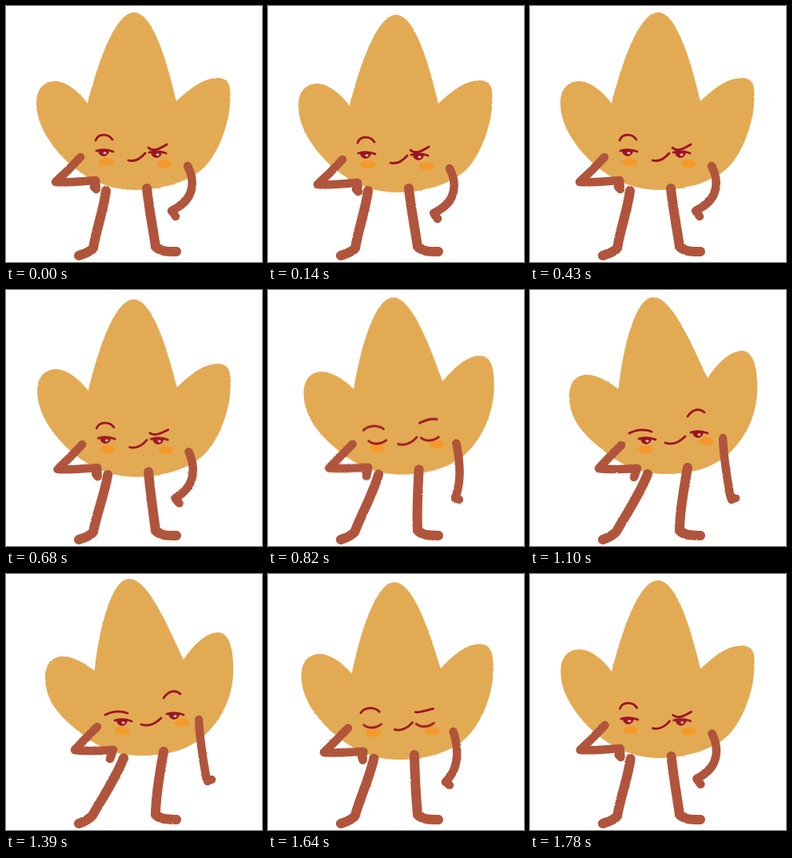
Write an HTML page without scripts that moves like this. It is 320x320 px and loops after 1.85 s.

```html
<!DOCTYPE html>
<html lang="en">
<head>
<meta charset="utf-8">
<title>Smug little hat</title>
<style>
html, body { margin: 0; width: 100%; height: 100%; overflow: hidden; background: #fff; }
svg { display: block; width: 100vw; height: 100vh; }

.body { fill: #e3aa54; }
.limb { fill: none; stroke: #b0553c; stroke-width: 12; stroke-linecap: round; stroke-linejoin: round; }
.arm { stroke-width: 10.5; }
.line { fill: none; stroke: #9c1422; stroke-width: 2.8; stroke-linecap: round; }
.blush { fill: #f39a2c; }
.pupil { fill: #9c1422; }
.shine { fill: #f6d9b4; }

/* Each .sway part has a left and a right pose; this one stepped curve carries them all across and back */
.sway {
  animation: 1850ms infinite;
  animation-timing-function: linear(
    0 0% 32.97%, .04 32.97% 36.75%, .1 36.75% 40.54%, .25 40.54% 44.32%,
    .6 44.32% 48.1%, .9 48.1% 51.89%, 1.1 51.89% 55.67%, 1 55.67% 84.86%,
    .75 84.86% 88.64%, .33 88.64% 92.43%, .12 92.43% 96.21%, .03 96.21% 100%);
}
.bob, .lid, .pupil { animation: bob 1850ms steps(2, end) infinite; }
.lid { animation-name: lid; }
.pupil { animation-name: pupil; }

@keyframes bob {
  0%, 23.24%, 29.19%, 75.13%, 81.08%, 96.21%, 100% { transform: translateY(0); }
  7.56%, 59.45%, 88.64% { transform: translateY(3px); }
  11.89%, 63.78% { transform: translateY(3px); animation-timing-function: steps(3, end); }
  36.75% { transform: translateY(4px); animation-timing-function: steps(4, end); }
  51.89% { transform: translateY(1px); }
}
@keyframes lid {
  0%, 36.75%, 51.89%, 81.08%, 96.21%, 100% { d: path("M-9 0C-2 -2 5 -2 12 1"); }
  44.32%, 88.64% { d: path("M-10 4C-4 9 6 8 12 3"); }
}
@keyframes pupil {
  0%, 36.75%, 51.89%, 81.08%, 96.21%, 100% { transform: scaleY(1); }
  44.32%, 88.64% { transform: scaleY(0); }
}

.body { animation-name: body; }
@keyframes body {
  from { d: path("M102 122C111 86 134 8 160 8S205 85 213 119C229 104 246 90 264 90S281 103 280 122S270 175 252 197S195 230 163 230S106 219 84 201S38 152 38 122C38 103 48 94 62 94S93 109 102 122Z"); }
  to { d: path("M111 121C114 85 129 6 154 6S206 74 222 107C234 89 250 73 265 73S285 97 284 124S272 179 250 200S200 227 168 227S113 215 91 197S49 160 49 130C49 112 58 103 71 103S99 112 111 121Z"); }
}
.leg-l { animation-name: leg-l; }
@keyframes leg-l {
  from { d: path("M125 231C122 255 113 278 109 303C104 308 97 310 91 312"); }
  to { d: path("M147 230C136 258 120 280 108 302C103 307 97 310 91 312"); }
}
.leg-r { animation-name: leg-r; }
@keyframes leg-r {
  from { d: path("M176 228C179 255 184 280 187 301C195 308 205 307 213 307"); }
  to { d: path("M197 222C193 245 187 275 187 301C194 308 205 306 213 307"); }
}
.arm-l { animation-name: arm-l; }
@keyframes arm-l {
  from { d: path("M93 189C83 200 73 210 62 220C78 221 95 219 112 218L113 229L110 226"); }
  to { d: path("M114 191C103 202 94 211 86 220C100 222 118 221 134 220L130 231L132 226"); }
}
.arm-r { animation-name: arm-r; }
@keyframes arm-r {
  from { d: path("M227 200C236 217 236 239 214 252L207 256L212 263"); }
  to { d: path("M241 182C242 205 246 230 250 253L252 259L257 257"); }
}
.brow-l { animation-name: brow-l; }
@keyframes brow-l {
  from { d: path("M112 168C115 159 128 159 133 167"); }
  to { d: path("M124 176C134 171 144 171 152 174"); }
}
.brow-r { animation-name: brow-r; }
@keyframes brow-r {
  from { d: path("M178 177C184 183 193 178 201 173"); }
  to { d: path("M197 155C203 146 212 144 218 150"); }
}
.mouth { animation-name: mouth; }
@keyframes mouth {
  from { d: path("M153 193C161 195 168 191 174 184"); }
  to { d: path("M169 188C178 191 187 187 194 180"); }
}
.eye-l { animation-name: eye-l; }
@keyframes eye-l { from { transform: translate(122px, 181px); } to { transform: translate(145px, 183px); } }
.eye-r { animation-name: eye-r; }
@keyframes eye-r { from { transform: translate(188px, 183px); } to { transform: translate(210px, 175px); } }
.blush-l { animation-name: blush-l; }
@keyframes blush-l { from { transform: translate(125px, 195px); } to { transform: translate(145px, 196px); } }
.blush-r { animation-name: blush-r; }
@keyframes blush-r { from { transform: translate(198px, 197px); } to { transform: translate(220px, 186px); } }
</style>
</head>
<body>
<svg viewBox="0 0 320 320">
  <defs>
    <filter id="crayon" filterUnits="userSpaceOnUse" x="0" y="0" width="320" height="320" color-interpolation-filters="sRGB">
      <feTurbulence type="fractalNoise" baseFrequency=".4" numOctaves="2" seed="4"/>
      <feDisplacementMap in="SourceGraphic" scale="2" xChannelSelector="R" yChannelSelector="G"/>
    </filter>
  </defs>
  <g class="bob">
    <path class="sway body" filter="url(#crayon)"/>
    <ellipse class="sway blush blush-l" rx="9.5" ry="5.2"/>
    <ellipse class="sway blush blush-r" rx="9.5" ry="5.2"/>
    <g class="sway eye-l">
      <g class="pupil"><path d="M-7 0C-6 9 6 9 7 0Z"/><ellipse class="shine" cx="1.5" cy="2.8" rx="2" ry="1.4"/></g>
      <path class="line lid"/>
    </g>
    <g class="sway eye-r">
      <g class="pupil"><path d="M-7 0C-6 9 6 9 7 0Z"/><ellipse class="shine" cx="1.5" cy="2.8" rx="2" ry="1.4"/></g>
      <path class="line lid"/>
    </g>
    <path class="sway line brow-l"/>
    <path class="sway line brow-r"/>
    <path class="sway line mouth"/>
  </g>
  <g filter="url(#crayon)">
    <path class="sway limb leg-l"/>
    <path class="sway limb leg-r"/>
    <g class="bob">
      <path class="sway limb arm arm-l"/>
      <path class="sway limb arm arm-r"/>
    </g>
  </g>
</svg>
</body>
</html>
```
